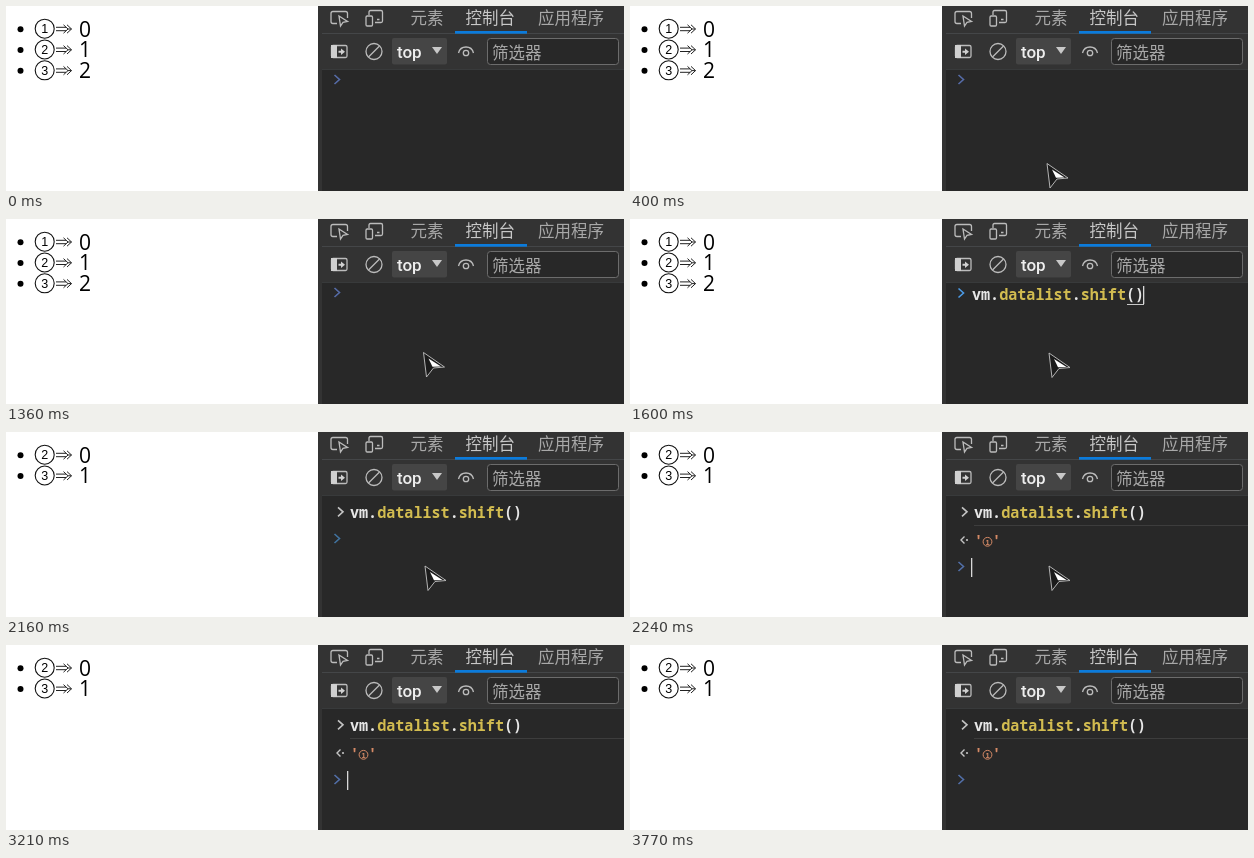
Animation, 618 px wide and 185 px high, one loop 4010 ms. Source, as an HTML page:

```html
<!DOCTYPE html>
<html lang="zh">
<head>
<meta charset="utf-8">
<title>Console shift</title>
<style>
html, body { margin: 0; width: 100%; height: 100%; overflow: hidden; background: #fff; }
svg { display: block; width: 618px; height: 185px; }
text { white-space: pre; }
.ui { font: 16.5px "Noto Sans CJK SC", "Noto Sans CJK", "Noto Sans", sans-serif; fill: #a8a8a8; }
.code { font: 600 15.1px "Noto Sans Mono", "DejaVu Sans Mono", monospace; fill: #e6e6e6; }
.prop { fill: #d2bc50; }
.num { font: 21px "Open Sans", "Noto Sans", sans-serif; }
.in { font: 12.5px "Liberation Sans", Arial, sans-serif; text-anchor: middle; }
.line { fill: none; stroke: #bcbcbc; stroke-width: 1.3; }
.chev { fill: none; stroke-width: 1.6; }
.caret { fill: #d8d8d8; }
</style>
</head>
<body>
<svg viewBox="0 0 618 185">
  <defs>
    <path id="arrow" fill="none" stroke="#222" d="M50 21.3H60M50 24.7H60M57.5 18.8L62 23L57.5 27.2M61 18.8L65.500 23L61 27.2M62 23H65.500"/>
    <path id="chev" d="M-2.500 -4.500L2.500 0L-2.500 4.500"/>
    <text id="code" class="code">vm.<tspan class="prop">datalist</tspan>.<tspan class="prop">shift</tspan>()</text>
  </defs>

  <rect width="618" height="185" fill="#fff"/>
  <g id="list"></g>

  <rect x="312" width="306" height="185" fill="#282828"/>
  <rect x="312" width="4" height="185" fill="#333"/>
  <rect x="312" width="306" height="63" fill="#333"/>
  <path d="M316 27.500H618" stroke="#444648"/>
  <path d="M316 63.500H618" stroke="#383a3b"/>
  <rect x="449" y="25" width="72" height="2.700" fill="#0b7bdc"/>

  <g class="line">
    <path d="M331 17.500H327Q325 17.500 325 15.500V7.500Q325 5.500 327 5.500H339.500Q341.500 5.500 341.500 7.500V12"/>
    <path d="M333 10L341.500 15.500L337 16.300L334.500 20Z"/>
    <path d="M363 9V6Q363 4.500 364.500 4.500H375Q376.500 4.500 376.500 6V15Q376.500 16.500 375 16.500H369M371 13.500H373.500"/>
    <rect x="360" y="10" width="6.500" height="10" rx="1.200"/>
    <rect x="325.500" y="39.500" width="15.500" height="12" rx="1.500"/>
    <circle cx="368" cy="45.500" r="8"/>
    <path d="M362.500 51L373.500 40"/>
    <path d="M452.500 47Q454 41 460 41T467.500 47"/>
    <circle cx="460" cy="47" r="2.700"/>
  </g>
  <path d="M325 39H331V52H325ZM332.500 44.700H335V42.500L339 45.700L335 49V46.700H332.500Z" fill="#d0d0d0"/>

  <text class="ui" x="404.500" y="17.500">元素</text>
  <text class="ui" x="459.500" y="17.500" style="fill:#c8c8c8">控制台</text>
  <text class="ui" x="532" y="17.500">应用程序</text>

  <rect x="386" y="32" width="55" height="26.500" rx="2" fill="#454545"/>
  <text class="ui" x="391" y="52" style="font:500 17px Roboto,'Liberation Sans',sans-serif;fill:#eee">top</text>
  <path d="M426 41H436L431 48Z" fill="#c8c8c8"/>
  <rect x="481.500" y="32.500" width="131" height="26" rx="3" fill="#282828" stroke="#6c6c6c"/>
  <text class="ui" x="486" y="52.500">筛选器</text>

  <g class="chev">
    <use href="#chev" x="331" y="73.500" stroke="#566ca8" data-on="0-1600"/>
    <use href="#chev" x="331" y="74" stroke="#4c9be6" data-on="1600-2160"/>
    <use href="#chev" x="334.500" y="79.800" stroke="#c4c4c4" data-on="2160-4010"/>
    <use href="#chev" x="331" y="106.500" stroke="#41739f" data-on="2160-2240"/>
    <use href="#chev" x="331" y="134.500" stroke="#526fa8" data-on="2240-4010"/>
  </g>

  <g data-on="1600-2160">
    <use href="#code" x="342" y="80.500"/>
    <path d="M497 85.500H514" stroke="#c8c8c8"/>
  </g>
  <use href="#code" x="344" y="86" data-on="2160-4010"/>

  <g data-on="2240-4010">
    <path d="M344 93.500H618" stroke="#3d3d3d"/>
    <path d="M334.500 104.500L331 108L334.500 111.500" fill="none" stroke="#c4c4c4" stroke-width="1.400"/>
    <circle cx="337" cy="108" r="1.100" fill="#c4c4c4"/>
    <g fill="#d58a66">
      <text class="code" x="344" y="114.500" style="fill:inherit">'</text>
      <text class="code" x="362" y="114.500" style="fill:inherit">'</text>
      <text class="in" x="357.500" y="112.500" style="font-size:7.500px;font-weight:bold">1</text>
    </g>
    <circle cx="357.500" cy="109.800" r="4.400" fill="none" stroke="#d58a66"/>
  </g>

  <g class="caret">
    <rect x="341" y="66" width="1.300" height="18" data-on="720-1360"/>
    <rect x="513" y="67" width="1.300" height="18" data-on="1600-2160"/>
    <rect x="341" y="126" width="1.300" height="19" data-on="2240-2720 3210-3770"/>
  </g>

  <g id="mouse">
    <path d="M0 0L21 14.500L10 15.500L3 24.500Z" fill="#1b1b1b" stroke="#c4c4c4" stroke-width=".9"/>
    <path d="M5 6L17.500 14L9 14.300Z" fill="#fff"/>
  </g>
</svg>
<script>
const LOOP = 4010;

// Pointer tip: [start ms, x, y]; a row without a place hides it.
const moves = [
  [0], [320, 420, 175.5], [400, 417, 157.5], [480, 415.5, 141.5],
  [560, 415.5, 133.5], [1360, 417.5, 133.5], [1440, 419, 134],
  [2720, 427.5, 182.5], [2800]
];

const row = (mark, index, line, on) => `
  <g transform="translate(0 ${line * 20.8})" data-on="${on}">
    <circle cx="14.500" cy="23.200" r="3"/>
    <circle cx="38.700" cy="22.700" r="9.500" fill="none" stroke="#111" stroke-width="1.100"/>
    <text class="in" x="38.700" y="27.100">${mark}</text>
    <use href="#arrow"/>
    <text class="num" x="73" y="30.500">${index}</text>
  </g>`;

const before = "0-2160", after = "2160-4010";
document.getElementById("list").innerHTML =
  [1, 2, 3].map((m, i) => row(m, i, i, before)).join("") +
  [2, 3].map((m, i) => row(m, i, i, after)).join("");

const parts = [...document.querySelectorAll("[data-on]")].map(el => ({
  el, spans: el.dataset.on.split(" ").map(s => s.split("-").map(Number))
}));
const mouse = document.getElementById("mouse");

function draw(t) {
  for (const { el, spans } of parts) {
    const on = spans.some(([a, b]) => t >= a && t < b);
    el.style.display = on ? "" : "none";
  }
  const [, x, y] = moves.filter(m => m[0] <= t).pop();
  mouse.style.display = x === undefined ? "none" : "";
  if (x !== undefined) mouse.setAttribute("transform", `translate(${x} ${y})`);
}

const start = performance.now();
function tick(now) {
  draw(Math.max(0, now - start) % LOOP);
  requestAnimationFrame(tick);
}
draw(0);
requestAnimationFrame(tick);
</script>
</body>
</html>
```
